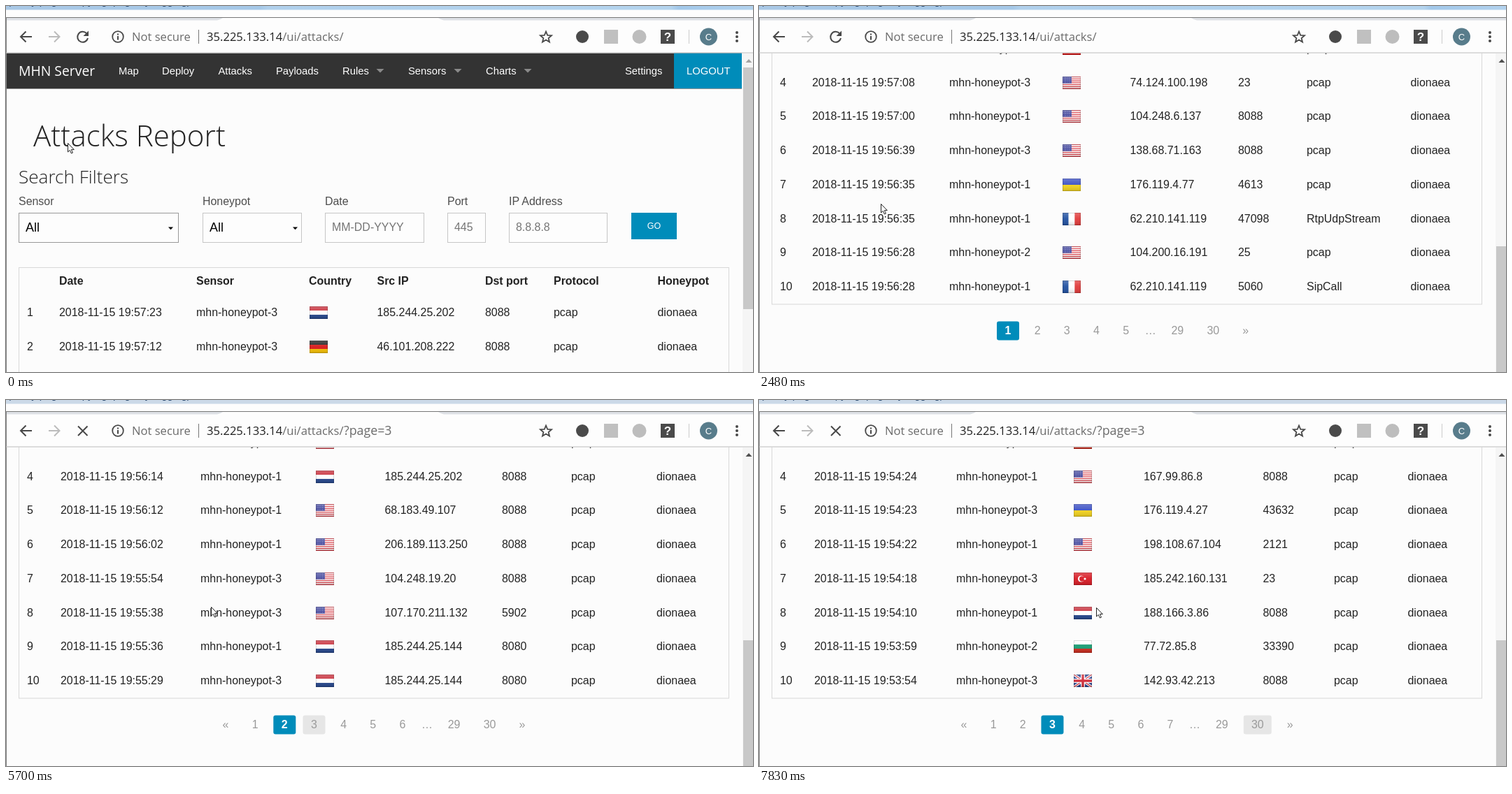
Animation, 1068 px wide and 524 px high, one loop 8000 ms. Source, as an HTML page:

```html
<!DOCTYPE html>
<html lang="en">
<head>
<meta charset="utf-8">
<title>Attacks Report</title>
<style>
  html, body { margin: 0; width: 100%; height: 100%; overflow: hidden; background: #fcfcfc; }
  svg { display: block; }
  text { font: 15.95px "Liberation Sans", Arial, sans-serif; fill: #222; white-space: pre; }
  .bold { font-weight: 700; }
  .mid { text-anchor: middle; }
  .title { font: 300 42.1px "Open Sans", sans-serif; }
  .subtitle { font: 300 26.15px "Open Sans", sans-serif; }
  .brand { font: 19.35px "Open Sans", sans-serif; fill: #fff; }
  .nav { font-size: 14.8px; fill: #fff; }
  .label { fill: #4d4d4d; }
  .choice { font-size: 18px; fill: #000; }
  .hint { fill: #757575; }
  .go { font-size: 12.5px; fill: #fff; }
  .pager { fill: #999; }
  .pager.bold { fill: #fff; }
  .bar { font: 16.6px "Open Sans", sans-serif; fill: #6b6b6b; }
  .line { fill: none; stroke: #484848; stroke-width: 2; }
</style>
</head>
<body>
<svg width="1068" height="524" viewBox="0 0 1068 524">
  <defs>
    <clipPath id="view"><rect x="1" y="67.5" width="1052" height="457"/></clipPath>
    <clipPath id="strip"><rect width="1068" height="5"/></clipPath>
    <linearGradient id="gloss" x2="0" y2="1">
      <stop offset="0" stop-color="#fff" stop-opacity=".24"/>
      <stop offset=".5" stop-color="#fff" stop-opacity=".05"/>
      <stop offset="1" stop-opacity=".15"/>
    </linearGradient>
    <linearGradient id="sky">
      <stop offset="0" stop-color="#a9c8e6"/>
      <stop offset=".34" stop-color="#a5c8e8"/>
      <stop offset=".35" stop-color="#b0d0ec"/>
      <stop offset=".89" stop-color="#b4d4ee"/>
      <stop offset=".9" stop-color="#a2c8ea"/>
      <stop offset="1" stop-color="#b2d2ee"/>
    </linearGradient>
    <g id="flags"></g>
  </defs>

  <rect width="1068" height="524" fill="#fcfcfc"/>
  <g clip-path="url(#view)"><g id="content"></g></g>

  <!-- scrollbar -->
  <rect x="1053" y="68" width="15" height="456" fill="#f5f5f5"/>
  <rect id="thumb" x="1054" y="88" width="14" height="346" fill="#c8c8c8"/>
  <path id="up" d="M1057.5 81h9l-4.5 -5z"/>

  <!-- window frame -->
  <rect width="1068" height="67" fill="#fdfdfd"/>
  <rect id="stripFill" width="1068" height="5.5" fill="url(#sky)"/>
  <g clip-path="url(#strip)"><text x="2" y="-2.5" style="font-size:15px;fill:#26466d">(many pages copying, page by logging)</text></g>
  <path d="M0 17H310Q306 20 302 20.500H0zM618 17H1068V20.500H626Q622 20 618 17z" fill="#dee1e6"/>
  <path d="M0 16.500H1068" stroke="#777"/>
  <path d="M.5 16V524" stroke="#808080"/>
  <path d="M0 67H1068" stroke="#bdbdbd"/>

  <!-- toolbar -->
  <path class="line" d="M37 44H22M28.500 36.500L21 44L28.500 51.500"/>
  <path class="line" style="stroke:#bcbcbc" d="M61 44H76M69 36.500L76.500 44L69 51.500"/>
  <g id="reload">
    <path class="line" d="M115 39A7.500 7.500 0 1 0 117 46"/>
    <path d="M118 35.500V43H110.500z" fill="#484848"/>
  </g>
  <path id="stop" class="line" d="M103 37.500L116.500 51M116.500 37.500L103 51"/>
  <circle class="line" cx="160" cy="44" r="7.800" style="stroke-width:1.800"/>
  <path class="line" d="M160 43V48.500M160 39.500V41.500"/>
  <text class="bar" x="180" y="50">Not secure</text>
  <path d="M275.500 34V54" stroke="#777"/>
  <text class="bar" x="287" y="50"><tspan fill="#222">35.225.133.14</tspan>/ui/attacks/</text>
  <text class="bar" id="query" x="483" y="50" style="font-size:17.8px"></text>
  <path class="line" style="stroke-width:1.800" d="M772 36.500L774.200 41.800L780 42.200L775.600 46L777 51.500L772 48.500L767 51.500L768.400 46L764 42.200L769.800 41.800z"/>
  <circle cx="824" cy="44" r="9" fill="#4a4a4a"/>
  <rect x="855" y="34" width="20" height="20" fill="#c0c0c0"/>
  <circle cx="905.500" cy="44" r="10" fill="#bdbdbd"/>
  <rect x="936" y="34" width="20" height="20" fill="#4a4a4a"/>
  <text class="mid bold" x="946" y="50" style="fill:#fff;font-size:17px">?</text>
  <path d="M976.500 34V54" stroke="#ccc"/>
  <circle cx="1004.500" cy="44" r="12.500" fill="#587c8b"/>
  <text class="mid" x="1004.500" y="49" style="fill:#fff;font-size:13px">C</text>
  <g fill="#484848"><circle cx="1045" cy="38" r="2"/><circle cx="1045" cy="44" r="2"/><circle cx="1045" cy="50" r="2"/></g>

  <g id="cursor" fill="#fff" stroke="#222" stroke-linejoin="round">
    <path id="arrow" d="M.5 .5V13L3.300 10.400L5.400 15L7.400 14.100L5.400 9.600H9.300z"/>
    <path id="hand" d="M-1 2Q.5 0 2 2V8Q3.500 6.500 4.800 8.200Q6.500 7 7.500 8.800Q9 8 9.300 9.800V13L8 18H0L-4.500 11.500Q-4 9.500 -1 12z"/>
  </g>
</svg>

<script>
const $ = id => document.getElementById(id);
const BLUE = '#008cba', LOOP = 8000;

const text = (x, y, s, cls = '') => `<text x="${x}" y="${y}" class="${cls}">${s}</text>`;
const rect = (x, y, w, h, fill, extra = '') =>
  `<rect x="${x}" y="${y}" width="${w}" height="${h}" fill="${fill}" ${extra}/>`;
const path = (d, stroke, width) => `<path d="${d}" fill="none" stroke="${stroke}" stroke-width="${width}"/>`;

// Flags, 26 by 18
const bands = (...c) => c.map((f, i) => rect(0, i * 18 / c.length, 26, 18 / c.length, f)).join('');
const columns = (...c) => c.map((f, i) => rect(i * 26 / c.length, 0, 26 / c.length, 18, f)).join('');
const cross = 'M13 0V18M0 9H26', saltire = 'M0 0L26 18M26 0L0 18';
const usStripes = Array.from({ length: 13 }, (_, i) => i % 2 ? '#fff' : '#d8343f');
const flags = {
  nl: bands('#c8303c', '#fff', '#25468c'),
  de: bands('#222', '#d81818', '#f6c000'),
  ru: bands('#fff', '#2222d0', '#dc1414'),
  ua: bands('#3a4fc4', '#f2d21c'),
  bg: bands('#fff', '#169a70', '#cc2a1c'),
  fr: columns('#1f4fa0', '#fff', '#e03a3a'),
  us: bands(...usStripes) + rect(0, 0, 13, 9.7, '#3b3f98') +
      `<path d="M1.500 2H13M1.500 5H13M1.500 8H13" stroke="#b9bce0" stroke-dasharray="1 1.500"/>`,
  tr: rect(0, 0, 26, 18, '#d81a24') + '<circle cx="10.500" cy="9" r="4.600" fill="#fff"/>' +
      '<circle cx="11.800" cy="9" r="3.700" fill="#d81a24"/><circle cx="16" cy="9" r="1.600" fill="#fff"/>',
  gb: rect(0, 0, 26, 18, '#24408e') + path(saltire, '#fff', 3.6) + path(saltire, '#d02836', 1.2) +
      path(cross, '#fff', 6) + path(cross, '#d02836', 3.4)
};
$('flags').innerHTML = Object.entries(flags).map(([id, art]) =>
  `<symbol id="${id}" viewBox="0 0 26 18">${art}${rect(0, 0, 26, 18, 'url(#gloss)')}` +
  `${rect(.5, .5, 25, 17, 'none', 'stroke="#000" stroke-opacity=".15"')}</symbol>`).join('');

// Rows: time, sensor number, flag, source, port, protocol (pcap if absent)
const pages = [
  { cols: [30, 76, 272, 433, 530.5, 685, 783, 931.5], rows: `
    19:57:23 3 nl 185.244.25.202 8088
    19:57:12 3 de 46.101.208.222 8088
    19:57:11 3 ru 213.183.57.38 8088
    19:57:08 3 us 74.124.100.198 23
    19:57:00 1 us 104.248.6.137 8088
    19:56:39 3 us 138.68.71.163 8088
    19:56:35 1 ua 176.119.4.77 4613
    19:56:35 1 fr 62.210.141.119 47098 RtpUdpStream
    19:56:28 2 us 104.200.16.191 25
    19:56:28 1 fr 62.210.141.119 5060 SipCall`,
    first: 356, labels: '1 2 3 4 5 … 29 30 »', current: '1', next: '2' },
  { cols: [30, 78, 278, 442.5, 541.5, 709, 808, 930], rows: `
    19:56:28 1 fr 62.210.141.119 5060 SipCall
    19:56:28 1 fr 62.210.141.119 5060 SipSession
    19:56:25 2 us 138.68.71.163 8088
    19:56:14 1 nl 185.244.25.202 8088
    19:56:12 1 us 68.183.49.107 8088
    19:56:02 1 us 206.189.113.250 8088
    19:55:54 3 us 104.248.19.20 8088
    19:55:38 3 us 107.170.211.132 5902
    19:55:36 1 nl 185.244.25.144 8080
    19:55:29 3 nl 185.244.25.144 8080`,
    first: 314, labels: '« 1 2 3 4 5 6 … 29 30 »', current: '2', next: '3' },
  { cols: [30, 79, 282, 449.5, 550, 720.5, 822, 927.5], rows: `
    19:55:03 1 nl 185.244.25.202 8088
    19:54:41 1 us 138.68.71.163 8088
    19:54:30 3 bg 77.72.85.117 3389
    19:54:24 1 us 167.99.86.8 8088
    19:54:23 3 ua 176.119.4.27 43632
    19:54:22 1 us 198.108.67.104 2121
    19:54:18 3 tr 185.242.160.131 23
    19:54:10 1 nl 188.166.3.86 8088
    19:53:59 2 bg 77.72.85.8 33390
    19:53:54 3 gb 142.93.42.213 8088`,
    first: 293, labels: '« 1 2 3 4 5 6 7 … 29 30 »', current: '3', next: '30' }
];
const headings = ['', 'Date', 'Sensor', 'Country', 'Src IP', 'Dst port', 'Protocol', 'Honeypot'];

function table({ cols, rows }) {
  const head = headings.map((h, i) => text(cols[i], 399, h, 'bold')).join('');
  return head + rows.trim().split('\n').map((line, r) => {
    const [time, sensor, flag, ip, port, protocol = 'pcap'] = line.trim().split(' ');
    const y = Math.round(444.3 + r * 48.75);
    const cells = [r + 1, '2018-11-15 ' + time, 'mhn-honeypot-' + sensor, '', ip, port, protocol, 'dionaea'];
    return cells.map((c, i) => text(cols[i], y, c)).join('') +
      `<use href="#${flag}" x="${Math.round(cols[3] + .6)}" y="${y - 14}" width="26" height="18"/>`;
  }).join('');
}

function pager({ first, labels, current, next }) {
  const gapAfter = { '…': 38.7, 29: 51, 30: 46.4 };
  const items = labels.split(' ');
  let x = first;
  return items.map((s, i) => {
    const half = s.length > 1 ? 20 : 16;
    const box = (fill, extra = '') => rect(x - half, 927.5, 2 * half, 27, fill, `rx="3" ${extra}`);
    const mark = s === current ? box(BLUE) : s === next ? box('#e6e6e6', 'class="focus"') : '';
    const item = mark + text(x, 946, s, 'pager mid' + (s === current ? ' bold' : ''));
    x += items[i + 1] === '…' ? 35 : gapAfter[s] || 42.15;
    return item;
  }).join('');
}

function header() {
  const links = [['Map', 161], ['Deploy', 223], ['Attacks', 303.5], ['Payloads', 386], ['Rules', 481],
    ['Sensors', 575], ['Charts', 686], ['Settings', 885], ['LOGOUT', 973]];
  const field = (x, w, label, value, cls, extra = '') =>
    text(x, 285, label, 'label') + rect(x + .5, 296.5, w, 42, '#fdfdfd', `stroke="#c6c6c6" ${extra}`) +
    text(x + 10, cls === 'choice' ? 323 : 322, value, cls);
  const caret = (x, y, half, h, fill) => `<path d="M${x - half} ${y}h${2 * half}l${-half} ${h}z" fill="${fill}"/>`;
  return rect(1, 67, 1051, 51.5, '#333') + rect(955, 67, 97, 51, BLUE) +
    text(18, 99.5, 'MHN Server', 'brand') +
    links.map(([s, x]) => text(x, 97.5, s, 'nav')).join('') +
    [535, 646, 746].map(x => caret(x, 90, 5.5, 5.5, '#8a8a8a')).join('') +
    text(39, 201, 'Attacks Report', 'title') + text(18, 254, 'Search Filters', 'subtitle') +
    field(18, 228, 'Sensor', 'All', 'choice', 'id="sensor"') + field(281, 141, 'Honeypot', 'All', 'choice') +
    field(456, 141, 'Date', 'MM-DD-YYYY', 'hint') + field(631, 54, 'Port', '445', 'hint') +
    field(719, 140, 'IP Address', '8.8.8.8', 'hint') +
    caret(235.5, 316.5, 3.5, 3.8, '#000') + caret(413.5, 316.5, 3.5, 3.8, '#000') +
    rect(894, 296, 65, 38, BLUE) + text(926.5, 319, 'GO', 'go mid') +
    rect(18.5, 374.5, 1015, 528.5, 'none', 'stroke="#d8d8d8"');
}

$('content').innerHTML = header() + pages.map(p => `<g class="page">${table(p)}${pager(p)}</g>`).join('');
const pageNodes = [...document.querySelectorAll('.page')];
const focusNodes = [...document.querySelectorAll('.focus')];

// Step tracks: [time, ...values], each held until the next
const scrollTrack = [[0, 0], [1390, 30], [1490, 89], [1610, 150], [1720, 220], [1825, 295], [1935, 370],
  [2040, 435], [2150, 476], [3770, 0], [4130, 15], [4250, 85], [4375, 300], [4500, 476],
  [5810, 0], [6300, 60], [6410, 260], [6520, 435], [6640, 476]];
const cursorTrack = [[0, 88, 196, 'arrow'], [850, 84, 198, 'arrow'], [955, 79, 200, 'arrow'], [1060, 75, 202, 'arrow'],
  [2250, 90, 218, 'arrow'], [2365, 125, 248, 'arrow'], [2480, 174, 283, 'arrow'], [2600, 290, 380, 'arrow'],
  [2715, 395, 460, 'hand'], [2830, 345, 390, 'hand'], [2950, 270, 297, 'hand'],
  [4740, 345, 365, 'arrow'], [4850, 438, 460, 'hand'], [5075, 375, 385, 'hand'], [5190, 293, 296, 'hand'],
  [5570, 293, 296, 'arrow'], [6060, 293, 296, 'hand'],
  [7000, 420, 355, 'arrow'], [7120, 600, 430, 'arrow'], [7245, 712, 460, 'hand'], [7370, 482, 297, 'hand'],
  [7830, 482, 297, 'arrow']];
const pageTrack = [[0, 0], [3770, 1], [5810, 2]];
const queryTrack = [[0, ''], [3290, '?page=2'], [5570, '?page=3']];
const loadTrack = [[0, false], [3170, true], [4010, false], [5570, true], [6060, false], [7830, true]];
const focusTimes = [2715, 4850, 7245];

const at = (track, t) => track.findLast(k => k[0] <= t).slice(1);
const show = (node, on) => { node.style.display = on ? '' : 'none'; };

function draw(t) {
  const [scroll] = at(scrollTrack, t), [page] = at(pageTrack, t), [loading] = at(loadTrack, t);
  const [x, y, shape] = at(cursorTrack, t);
  $('content').setAttribute('transform', `translate(0 ${-scroll})`);
  $('thumb').setAttribute('y', Math.round(88 + scroll * .538));
  $('up').setAttribute('fill', scroll > 85 ? '#505050' : '#a3a3a3');
  $('sensor').setAttribute('stroke', page ? '#c6c6c6' : '#999');
  $('stripFill').setAttribute('fill', t < 3290 ? 'url(#sky)' : '#cbd9e8');
  $('query').textContent = at(queryTrack, t)[0];
  $('cursor').setAttribute('transform', `translate(${x} ${y})`);
  show($('arrow'), shape === 'arrow');
  show($('hand'), shape === 'hand');
  show($('reload'), !loading);
  show($('stop'), loading);
  pageNodes.forEach((node, i) => show(node, i === page));
  focusNodes.forEach((node, i) => show(node, t >= focusTimes[i]));
}

const start = performance.now();
function tick() {
  draw((performance.now() - start) % LOOP);
  requestAnimationFrame(tick);
}
tick();
</script>
</body>
</html>
```
